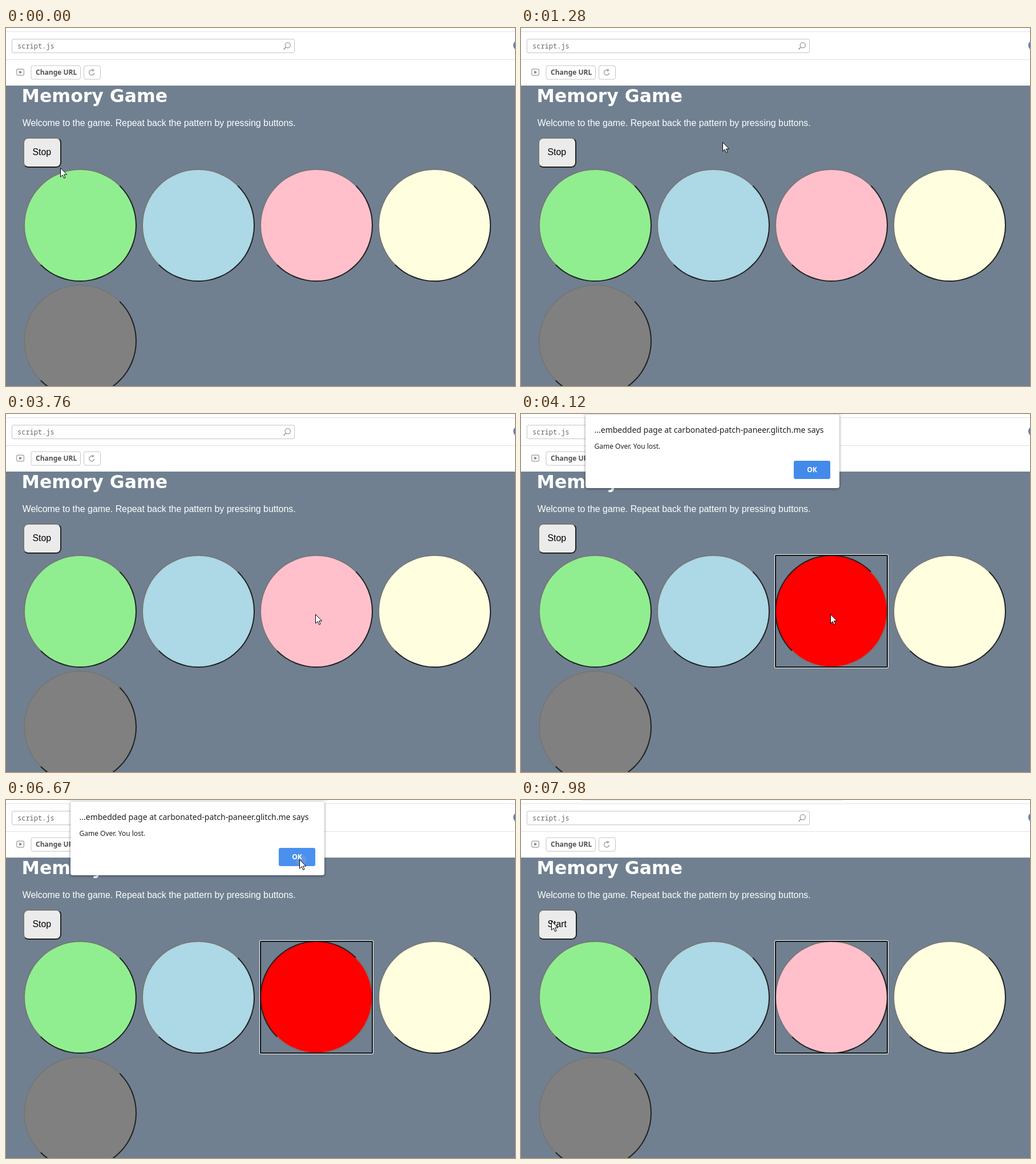
These frames come from a looping animation (892 by 628 pixels, 8 s). An HTML page:

```html
<!DOCTYPE html>
<html lang="en">
<head>
<meta charset="utf-8">
<title>Memory Game</title>
<style>
  html, body { margin: 0; width: 100%; height: 100%; overflow: hidden; background: #fff; }
  #stage { position: absolute; left: 0; top: 0; width: 892px; height: 628px; overflow: hidden; background: #fff; }
  #stage > *, #dialog > * { position: absolute; box-sizing: border-box; }
  svg { left: 0; top: 0; overflow: visible; }

  .ui { font-family: "Noto Sans", "Open Sans", sans-serif; }
  .code { font: 12px "Noto Sans Mono", "DejaVu Sans Mono", monospace; fill: #666; }
  .title { font: bold 31.5px "DejaVu Sans", Verdana, sans-serif; fill: #fff; }
  .body { font: 15.88px "Liberation Sans", Arial, sans-serif; }

  .key { border: 2px solid; border-color: #767676 #212121 #212121 #767676; }
  .key.down { border-color: #212121 #767676 #767676 #212121; }
  .disc { width: 198px; height: 198px; border-radius: 50%; }
  #toggle {
    left: 29.5px; top: 192px; height: 53px; padding-left: 15px; line-height: 48px;
    border-radius: 9px; background: #ebebeb; color: #000;
  }
  #ring {
    left: 445px; top: 247px; width: 198px; height: 198px;
    border: 2px solid #101010; border-radius: 2px; box-shadow: 0 0 0 1px #fff;
  }
  #strip { left: 107px; top: 0; width: 457px; height: 2px; background: #f3f3f3; }

  #dialog {
    left: 113px; top: 3px; width: 445px; height: 129px; background: #fff;
    border-radius: 4px; box-shadow: 0 1px 4px rgba(0, 0, 0, .5); transform-origin: 50% 0;
  }
  #dialog p { margin: 0; left: 15.5px; line-height: 20px; white-space: nowrap; color: #202124; }
  #ok {
    left: 365px; top: 81px; width: 64px; height: 32px; border-radius: 3px; overflow: hidden;
    background: #438bea; color: #fff; font-size: 12px; font-weight: 600; line-height: 32px; text-align: center;
  }
  #ok.down { background: radial-gradient(circle at 39px 22px, #6499e0 9px, #4a90ee 10px); }
</style>
</head>
<body>
<div id="stage">
  <svg width="892" height="628">
    <path d="M0 6.5H892M0 55.5H892" stroke="#e0e0e0"/>
    <rect y="101" width="892" height="527" fill="#708090"/>
    <g fill="none" stroke="#c4c4c4">
      <rect x="10.5" y="19.5" width="495" height="24" rx="2.5"/>
      <rect x="44" y="66" width="86.5" height="24" rx="3.5"/>
      <rect x="136.5" y="66" width="29" height="24" rx="3.5"/>
    </g>
    <g fill="none" stroke="#a3a3a3" stroke-width="1.5">
      <circle cx="493.8" cy="30.2" r="4.6"/>
      <path d="M490.4 33.6L486.5 37.6" stroke-width="2"/>
      <path d="M152.5 74.4A4.5 4.5 0 1 0 154.6 78.6"/>
    </g>
    <path d="M150.5 71.5L155 73.3L151.5 77Z" fill="#a3a3a3"/>
    <rect x="18.8" y="72.2" width="12.6" height="10.6" rx="1.8" fill="none" stroke="#999" stroke-width="1.2"/>
    <path d="M23.4 74.8L28 77.5L23.4 80.2Z" fill="#777"/>
    <circle cx="899" cy="30.5" r="10" fill="#5b7fc0"/>
    <text class="code" x="20" y="36">script.js</text>
    <text class="ui" x="52" y="82" font-size="12" font-weight="600" fill="#505050">Change URL</text>
    <text class="title" x="27.6" y="130">Memory Game</text>
    <text class="body" x="28.7" y="172" fill="#fff">Welcome to the game. Repeat back the pattern by pressing buttons.</text>
  </svg>
  <div id="toggle" class="key body"></div>
  <div id="ring"></div>
  <div id="strip"></div>
  <div id="dialog" class="ui">
    <p style="top:17px;font-size:14px">...embedded page at carbonated-patch-paneer.glitch.me says</p>
    <p style="top:46px;font-size:12px">Game Over. You lost.</p>
    <div id="ok">OK</div>
  </div>
  <svg id="cursor" width="14" height="21">
    <path d="M.5 .5V16.2L4.1 12.9L6.6 18.5L9 17.5L6.6 12H11.6Z" fill="#fff" stroke="#000"/>
  </svg>
</div>
<script>
  const LOOP = 8000;
  const $ = id => document.getElementById(id);
  const [toggle, ring, strip, dialog, ok, cursor] =
    ['toggle', 'ring', 'strip', 'dialog', 'ok', 'cursor'].map($);

  const discs = [
    ['#90ee90', 0, 0], ['#add8e6', 1, 0], ['#ffc0cb', 2, 0], ['#ffffe0', 3, 0], ['#808080', 0, 1]
  ].map(([color, col, row]) => {
    const el = document.createElement('div');
    el.className = 'key disc';
    el.style.cssText = `left:${31 + col * 206.9}px;top:${247.3 + row * 202.2}px;background:${color}`;
    $('stage').insertBefore(el, ring);
    return el;
  });

  // Pointer moves: first step, last step, number of steps, end x, end y
  const moves = [
    [30, 265, 7, 353, 200],
    [2270, 2940, 16, 366, 360],
    [3100, 3100, 1, 365, 360],
    [3250, 3690, 10, 542, 351],
    [4560, 4950, 9, 506, 122],
    [5000, 5190, 5, 514, 104],
    [7270, 7520, 7, 220, 142],
    [7740, 7980, 7, 53, 212]
  ];

  // Dialog poses: time, opacity, y offset, scale
  const poses = [
    [0, 0, -20, 1],
    [3990, .3, -14, 1.006], [4060, .8, -6, 1.002], [4120, 1, -2, 1], [4190, 1, 0, 1],
    [6810, .85, -3, 1.001], [6850, .6, -8, 1.003], [6890, .35, -12, 1.005], [6940, .15, -16, 1.007],
    [7000, 0, -20, 1]
  ];

  const within = (t, from, to) => t >= from && t < to;
  const ease = p => p * p * (3 - 2 * p);

  function pointer(t) {
    let x = 95, y = 245;
    for (const [from, to, n, endX, endY] of moves) {
      if (t < from) break;
      const gap = (to - from) / (n - 1) || 1;
      const p = ease(Math.min(n, Math.floor((t - from) / gap + 1e-6) + 1) / n);
      x += (endX - x) * p;
      y += (endY - y) * p;
    }
    return [Math.round(x), Math.round(y)];
  }

  function draw(t) {
    const [x, y] = pointer(t);
    cursor.style.transform = `translate(${x}px,${y}px)`;

    const pressed = within(t, 3790, 6850);
    discs[1].style.background = within(t, 280, 1280) ? '#00f' : '#add8e6';
    discs[2].style.background = pressed ? '#f00' : '#ffc0cb';
    discs[2].classList.toggle('down', pressed);
    ring.style.display = t >= 3790 ? '' : 'none';

    const stopped = t >= 6850;
    toggle.textContent = stopped ? 'Start' : 'Stop';
    toggle.style.width = stopped ? '68.5px' : '67.5px';

    const [, alpha, dy, scale] = poses.filter(p => p[0] <= t).pop();
    dialog.style.opacity = alpha;
    dialog.style.transform = scale === 1 ? `translateY(${dy}px)` : `translateY(${dy}px) scaleX(${scale})`;
    ok.classList.toggle('down', within(t, 6670, 6810));
    strip.style.display = t >= 3990 ? '' : 'none';
  }

  const start = performance.now();
  function frame() {
    draw((performance.now() - start) % LOOP);
    requestAnimationFrame(frame);
  }
  frame();
</script>
</body>
</html>
```
